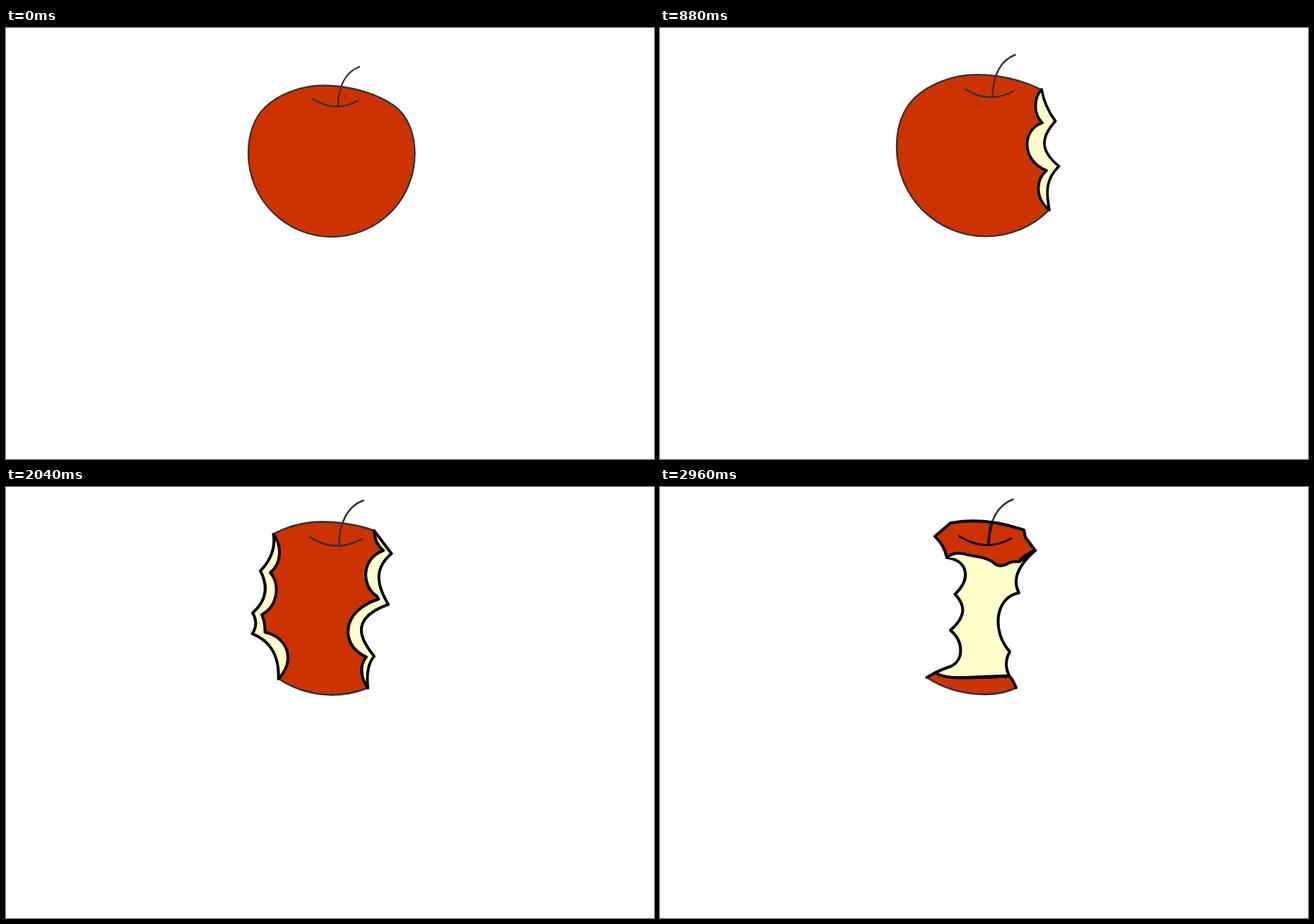
These frames come from a looping animation (917x611 px, 3000 ms). An HTML page:

```html
<!DOCTYPE html>
<html lang="en">
<head>
<meta charset="utf-8">
<title>Eaten apple</title>
<style>
  html, body { margin: 0; width: 100%; height: 100%; overflow: hidden; background: #fff; }
  svg { display: block; width: 100%; height: 100%; }
</style>
</head>
<body>
<svg viewBox="0 0 917 611"><g id="apple" stroke-linecap="round" stroke-linejoin="round"></g></svg>
<script>
const LOOP = 3000, STEP = 40;
const PIVOT = { x: 461, y: 305 };
const RED = '#cc3300', CREAM = '#ffffcc', GREY = '#333', BLACK = '#000';
const CORE_SHIFT = -5.5;

// Time and size of the pulsing apple
const PULSE = [
  [0, 1], [640, 1.167], [880, 1.068], [1120, .988], [1360, .92], [1530, .869], [1680, .967],
  [2000, 1.173], [2040, 1.144], [2240, 1.017], [2320, .96], [2530, .815], [2800, 1.024], [2960, 1.15]
];

const path = (d, fill, stroke = 'none', width = 0) =>
  `<path d="${d}" fill="${fill}" stroke="${stroke}" stroke-width="${width}"/>`;

const scaleAtPivot = (k, dx = 0) =>
  `translate(${PIVOT.x + dx} ${PIVOT.y}) scale(${k}) translate(${-PIVOT.x} ${-PIVOT.y})`;

// Places artwork that was drawn at the given size
const place = (size, content, dx = 0) =>
  `<g transform="${scaleAtPivot(1 / size, dx)}">${content}</g>`;

const SKIN = 'M343 178C343 150 350 129 366.5 112.5C386 94 417 81.5 449 81.5' +
  'C487 81.5 525 93 549 110C570 125 578.5 152 578.5 178' +
  'C578.5 243.5 526 296 461 296C396 296 343 243 343 178Z';
const STEM = 'M470 111C470 82 481 62 500 55';
const DIMPLE = 'M434 100.5Q466 121 498 103';

const body = path(SKIN, RED, GREY, 2.3);
const stem = path(STEM, 'none', GREY, 2.3);
const dimple = path(DIMPLE, 'none', GREY, 2.3);
const whole = (dx = 0) => place(1, body + stem + dimple, dx);

// inner runs from top to bottom, outer runs back to the top; side is an x beyond the skin
function bite({ size, side, top, bottom, inner, outer }, dx) {
  const [topY, bottomY] = [top, bottom].map(p => +p.split(' ')[1]);
  return place(size,
    path(`M${bottom}${outer}L${side} ${topY - 30}V${bottomY + 30}Z`, '#fff') +
    path(`M${top}${inner}${outer}Z`, CREAM, BLACK, 3.55 * size), dx);
}

const firstBite = {
  size: 1.132, side: 640, top: '544.5 75', bottom: '590 197',
  inner: 'C531 89 533 111 545 124Q556 136 571.5 136.5C559 146 559 171 572 186Q580 195 590 197',
  outer: 'C580 188 579 160 584 135.5C570 125 564 112 559 101C554 90 550 83 544.5 75'
};
const rightBite = {
  size: 1.068, side: 640, top: '540 87', bottom: '551 258',
  inner: 'C529 99 528 122 541 134.5C512 144 511 188 547 202C531 216 531 242 551 258',
  outer: 'C546 232 546 214 564.5 196C538 174 538 156 559.5 132C549 118 543 104 540 87'
};
const leftBite = {
  size: .92, side: 290, top: '394.5 114', bottom: '400 278',
  inner: 'C405 127 403 147 391 157.5C402 169 401 193 382 205.5Q386 215 385 226C411 230 421 258 400 278',
  outer: 'C398 260 390 234 375 235Q377 219 368 202C391 184 390 171 379 156.5Q398 138 394.5 114'
};
const leftDeeper = {
  size: 1.144, side: 290, top: '378.5 67', bottom: '385.5 272',
  inner: 'C391 84 390 108 374 121.5C387 135 387 167 362 181Q367 192 366.5 206C398 212 411 246 385.5 272',
  outer: 'C387 240 374 218 348.5 208Q358 194 349 178.5C370 160 371 140 360 119Q383 95 378.5 67'
};
const rightDeeper = {
  size: 1.144, side: 640, top: '521 62', bottom: '512 285',
  inner: 'C522 76 526 83 534 90C503 101 502 140 525 155L527 159C508 165 483 180 484 207Q486 230 510 241C500 252 502 271 512 285',
  outer: 'C510 265 512 250 521 240C503 218 484 187 541 166.5C524 138 521 115 545.5 94.5L521 62'
};
const leftDeepest = {
  size: .96, side: 290, top: '390 104', bottom: '392 277',
  inner: 'C414 111 422 140 402 159.5C422 170 426 192 409 211C418 222 416 242 404 252Q403 266 392 277',
  outer: 'Q392 262 391 250C401 237 401 222 394 208.5C411 192 406 174 387.5 159C408 143 410 122 390 104'
};

function core() {
  const size = 1.15, line = 3.55 * size;
  const rim = 'C420 88 432 97 446 98Q466 101 474 109Q482 115 495 107Q503 105 508 106';
  const base = 'M377.5 270L389 263.5Q402 270.5 422 270.5Q445 270.5 459 269.5Q473 270.5 481 268Q488 269.5 494 267.5L498 272L504 284.5';
  const foot = 'C480 297 425 301 377.5 270';
  const flesh = 'M406 100C434 104 442 128 417.5 152C433 168 433 184 411 203C431 220 429 246 412 254' +
    'Q400 258 389 263.5Q402 270.5 422 270.5L494 267.5C488 255 489 244 495 233.5C469 205 474 156 508 150' +
    'C501 137 500 117 531 90L508 106';
  const cap = 'M411 51L389 70Q402 82 406 100' + rim + 'Q514 97 531 90L517 71L515 61Q460 42 411 51Z';
  return place(size,
      path(flesh + 'L406 100', CREAM) +
      path(flesh, 'none', BLACK, line) +
      path('M406 100' + rim + 'Z', CREAM) +
      path(base + foot, RED) +
      path('M504 284.5' + foot, 'none', GREY, 2.6) +
      path(base, 'none', BLACK, line) +
      path(cap, RED, BLACK, line)) +
    place(1, stem + path(DIMPLE, 'none', BLACK, 2.5), CORE_SHIFT) +
    place(size, path('M465 81.5Q465 66 470 50', 'none', BLACK, 3.8));
}

const STAGES = [
  whole(),
  whole() + bite(firstBite),
  whole() + bite(rightBite),
  whole() + bite(rightBite) + bite(leftBite),
  whole() + bite(rightDeeper) + bite(leftDeeper),
  whole(CORE_SHIFT) + bite(rightDeeper, CORE_SHIFT) + bite(leftDeepest),
  core()
];

function pulse(t) {
  const i = Math.max(1, PULSE.findIndex(([time]) => time >= t));
  const [t0, a] = PULSE[i - 1], [t1, b] = PULSE[i];
  return a + (b - a) * (t - t0) / (t1 - t0);
}

const apple = document.getElementById('apple');
let shown = -1;

function render(elapsed) {
  const t = Math.floor((elapsed % LOOP) / STEP) * STEP;
  const stage = Math.floor(t / LOOP * STAGES.length);
  if (stage !== shown) apple.innerHTML = STAGES[shown = stage];
  apple.setAttribute('transform', scaleAtPivot(pulse(t)));
}

const start = performance.now();
function tick() {
  render(performance.now() - start);
  requestAnimationFrame(tick);
}
tick();
</script>
</body>
</html>
```
